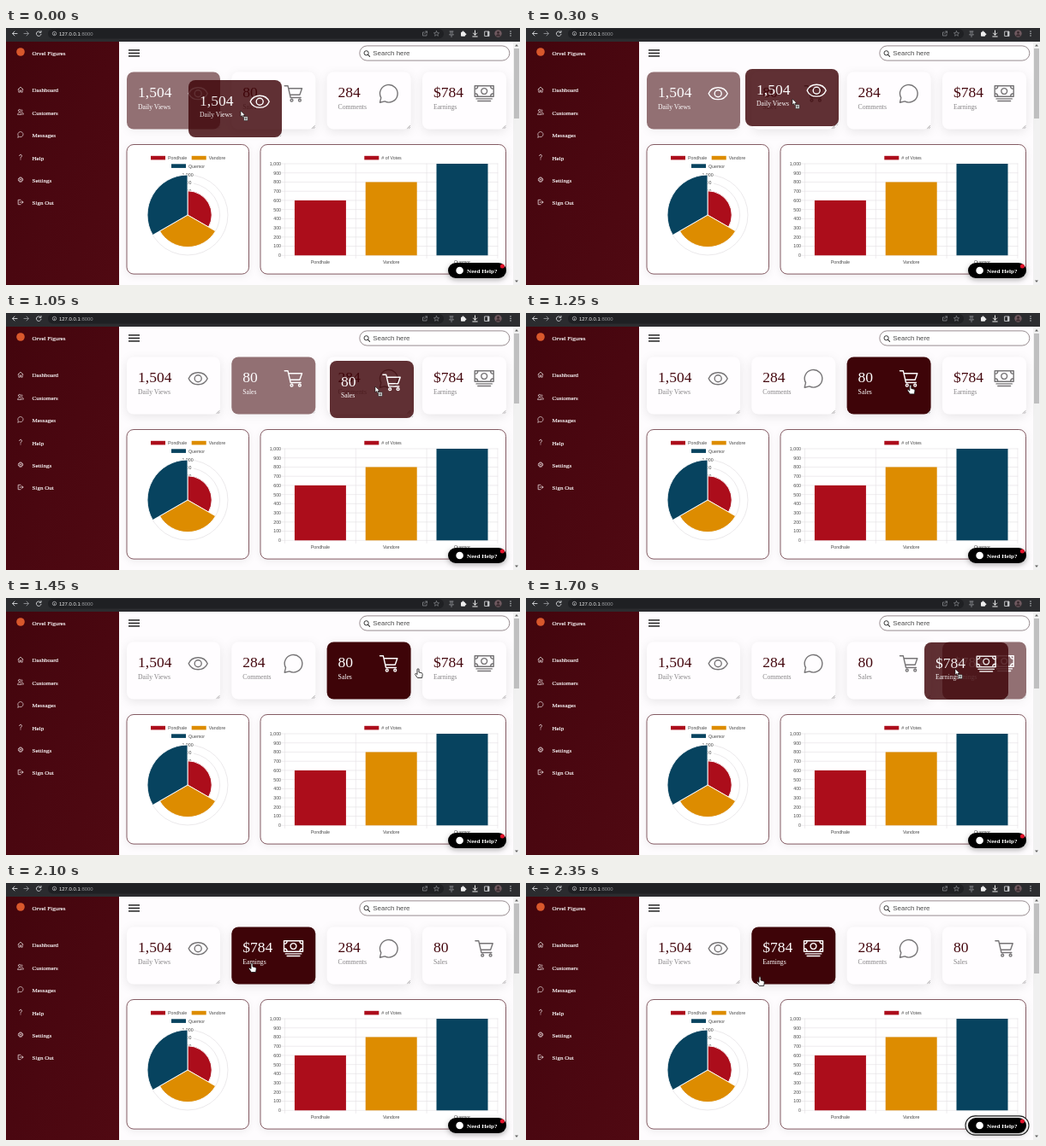
Write an HTML page that moves like this. It is 600 by 301 pixels and loops after 2400 ms.

```html
<!DOCTYPE html>
<html lang="en">
<head>
<meta charset="utf-8">
<title>Dashboard cards</title>
<style>
  html, body { margin: 0; width: 100%; height: 100%; overflow: hidden; background: #fefcfe; }
  svg { display: block; width: 600px; height: 301px; }
  text { white-space: pre; }
  .serif { font-family: "Liberation Serif", serif; }
  .sans { font-family: "Liberation Sans", sans-serif; }
  .nav { font-size: 7.05px; fill: #fff; stroke: #fff; stroke-width: .15px; }
  .line { fill: none; stroke-linecap: round; stroke-linejoin: round; }
  .tick { font-size: 5.27px; fill: #4c4c4c; }
  .panel { fill: #fff; stroke: #5c2630; stroke-width: .75px; filter: drop-shadow(0 2px 4px rgba(0, 0, 0, .07)); }
  .card .box { fill: #fffdff; filter: drop-shadow(0 3px 6px rgba(0, 0, 0, .09)); }
  .card .num { font-size: 17.5px; fill: #45080f; }
  .card .label { font-size: 7.7px; fill: #868486; }
  .card .icon { stroke: #777577; stroke-width: 1.4; }
  .card.hot .box { fill: #3e0408; }
  .card.hot text { fill: #fff; }
  .card.hot .icon { stroke: #fff; }
  .card.ghost { opacity: .56; }
  .card.drag { opacity: .82; }
  .card.drag .box { filter: none; }
</style>
</head>
<body>
<svg id="stage" viewBox="0 0 600 301" xmlns="http://www.w3.org/2000/svg"></svg>
<script>
const LOOP = 2400, STEP = 50;
const RED = '#ac0d1b', GOLD = '#dd8c00', BLUE = '#07435f';
const stage = document.getElementById('stage');

const rect = (x, y, w, h, fill, r = 0, extra = '') =>
  `<rect x="${x}" y="${y}" width="${w}" height="${h}" rx="${r}" fill="${fill}" ${extra}/>`;
const circle = (x, y, r, fill, extra = '') =>
  `<circle cx="${x}" cy="${y}" r="${r}" fill="${fill}" ${extra}/>`;
const text = (x, y, s, cls, extra = '') => `<text x="${x}" y="${y}" class="${cls}" ${extra}>${s}</text>`;
const line = (d, color, w = 1) => `<path class="line" d="${d}" stroke="${color}" stroke-width="${w}"/>`;
const at = (x, y, body) => `<g transform="translate(${x} ${y})">${body}</g>`;

function browserBar() {
  const c = '#c4c6c9', dim = '#85878b';
  return rect(0, 0, 600, 16, '#2b2c2f') + rect(49, 1, 462, 11.5, '#1f2023', 5.7) +
    line('M13 6.5H7.5M10 4L7.5 6.5L10 9', c) +
    line('M21 6.5H26.5M24 4L26.5 6.5L24 9', dim) +
    line('M40.5 5A2.8 2.8 0 1 0 41 7.3M41 3.5V5.3H39', c) +
    circle(56.5, 6.5, 2.2, 'none', `stroke="${c}" stroke-width=".7"`) + line('M56.5 6.3V7.6', c, .7) +
    `<text x="62" y="8.7" class="sans" font-size="5.95" fill="#f2f2f2">127.0.0.1<tspan fill="#9a9c9f">:8000</tspan></text>` +
    line('M488 5H486.5V9H491V7.5M488.5 6.8L491.5 4M489.5 4H491.5V6', dim, .8) +
    line('M502.5 3.5L503.4 5.6L505.6 5.8L503.9 7.2L504.4 9.3L502.5 8.1L500.6 9.3L501.1 7.2L499.4 5.8L501.6 5.6Z', dim, .7) +
    line('M518 4H522M519 4V6.5L517.5 8H522.5L521 6.5V4M520 8V10.5', dim, .9) +
    rect(531, 4.8, 5, 5, '#eee', .8) + circle(533.5, 4.5, 1.1, '#eee') + circle(536.3, 7.3, 1.1, '#eee') +
    line('M547.5 3V8M545.3 6L547.5 8.2L549.7 6M544.8 10H550.2', '#eee') +
    line('M559 4H564V9.5H559Z', c, .9) + rect(562, 4, 2, 5.5, c) +
    circle(574.5, 6.5, 4.2, '#6f5a60') + circle(574.5, 5.3, 1.5, '#3a2a2e') +
    `<path d="M571.7 9.4a2.9 2.9 0 0 1 5.6 0z" fill="#3a2a2e"/>` +
    [4, 6.5, 9].map(y => circle(589, y, .75, c)).join('');
}

function sidebar() {
  const w = '#e6dadc';
  const icons = [
    line('M-3 0L0 -3L3 0M-2.2 -.6V3.2H-.7V1H.7V3.2H2.2V-.6', w, .7),
    line('M-3.4 2.7C-3.2 -.2 .9 -.2 1.1 2.7ZM1.2 .5C2.5 .2 3.3 1.2 3.4 2.7H2.3M-2.6 -1.7A1.4 1.4 0 1 1 .2 -1.7A1.4 1.4 0 0 1 -2.6 -1.7M1.2 -2.8A1.2 1.2 0 0 1 1.4 -.6', w, .7),
    line('M-3.1 3.2L-2.7 1.5A3.1 3.1 0 1 1 -1.3 2.7Z', w, .7),
    line('M-1.3 -1.6C-1.3 -3.4 1.4 -3.4 1.4 -1.5C1.4 -.2 0 -.3 0 1M0 2.7V2.8', w, .9),
    circle(0, 0, 2.7, 'none', `stroke="${w}" stroke-width=".9" stroke-dasharray="1.6 .52"`) +
      circle(0, 0, 2, 'none', `stroke="${w}" stroke-width=".6"`) + circle(0, 0, .8, w),
    line('M0 -2.7H-2.8V2.7H0M-1 0H3M1.6 -1.4L3 0L1.6 1.4', w, .8)
  ];
  const names = ['Dashboard', 'Customers', 'Messages', 'Help', 'Settings', 'Sign Out'];
  return rect(0, 16, 132, 285, 'url(#wine)') + circle(17, 28, 4.8, '#d9582c') +
    text(30.5, 31.6, 'Orvel Figures', 'serif nav') +
    names.map((s, i) => at(17, 72 + i * 26.4, icons[i]) + text(30.5, 75.3 + i * 26.4, s, 'serif nav')).join('');
}

function header() {
  return [25.9, 29.4, 32.9].map(y => rect(143, y - .65, 13, 1.4, '#151515')).join('') +
    rect(412.8, 20.9, 175, 17.2, '#fff', 8.6, 'stroke="#75666a" stroke-width=".75"') +
    circle(420.6, 29.3, 2.6, 'none', 'stroke="#333" stroke-width="1"') + line('M422.6 31.3L424.6 33.3', '#333', 1.1) +
    text(428.3, 32.2, 'Search here', 'sans', 'font-size="7.95" fill="#4a4a4a"') +
    rect(592, 16, 8, 285, '#f1f1f1') + rect(593, 24, 6, 82, '#bfbfc0') +
    '<path d="M594 21.5h4l-2-2.5zM594 295.5h4l-2 2.5z" fill="#666"/>';
}

const series = [['Pondhale', 600, RED], ['Vandore', 800, GOLD], ['Quemor', 1000, BLUE]];
const comma = n => n.toLocaleString('en-US');
const legend = (x, y, s, color) => rect(x, y, 17, 4.6, color) + text(x + 20, y + 4.2, s, 'sans tick');

function polarChart() {
  const cx = 212, cy = 219, unit = .047;
  let out = rect(141, 136.5, 142.5, 151.6, '#fff', 8, 'class="panel"');
  [[169, 149.8], [216.7, 149.8], [193, 159.3]].forEach(([x, y], i) => out += legend(x, y, series[i][0], series[i][2]));
  for (let v = 200; v <= 1000; v += 200)
    out += circle(cx, cy, v * unit, 'none', 'stroke="#e2e0e2" stroke-width=".7"');
  for (let v = 200; v <= 1000; v += 200)
    out += rect(cx - 7, cy - v * unit - 3.3, 14, 6.6, '#fffc') +
      text(cx, cy - v * unit + 1.9, comma(v), 'sans tick', 'text-anchor="middle"');
  series.forEach(([, v, color], i) => {
    const p = k => {
      const a = (k * 120 - 90) * Math.PI / 180;
      return `${cx + v * unit * Math.cos(a)} ${cy + v * unit * Math.sin(a)}`;
    };
    out += `<path d="M${cx} ${cy}L${p(i)}A${v * unit} ${v * unit} 0 0 1 ${p(i + 1)}Z" fill="${color}" stroke="#fff" stroke-width=".9"/>`;
  });
  return out;
}

function barChart() {
  const x0 = 325.5, y0 = 266.3, cat = 82.8, unit = .1073;
  let out = rect(297, 136.5, 286.5, 151.6, '#fff', 8, 'class="panel"') + legend(418.3, 149.8, '# of Votes', RED);
  for (let v = 0; v <= 1000; v += 100) {
    const y = y0 - v * unit;
    out += line(`M322 ${y}H574`, '#e2e0e2', .6) + text(321, y + 1.9, comma(v), 'sans tick', 'text-anchor="end"');
  }
  for (let i = 0; i < 4; i++) out += line(`M${x0 + i * cat} 159V269.5`, '#e2e0e2', .6);
  series.forEach(([name, v, color], i) => {
    const mid = x0 + (i + .5) * cat;
    out += rect(mid - 30, y0 - v * unit, 60, v * unit, color) +
      text(mid, 276, name, 'sans tick', 'text-anchor="middle"');
  });
  return out;
}

const helpButton = () =>
  rect(0, 0, 0, 0, '#fff', 9, 'id="ring" stroke="#222" stroke-width="1.1"') +
  rect(516, 275, 68, 18, '#000', 9, 'style="filter:drop-shadow(0 2px 3px rgba(0,0,0,.3))"') +
  circle(529.6, 284, 4.3, '#fff') +
  text(538, 286.5, 'Need Help?', 'serif', 'font-size="7.15" font-weight="700" fill="#fff"') +
  circle(579.4, 279, 2.5, '#e3122b');

const slots = [141, 263.3, 374.6, 486], TOP = 51.5;
const cards = [
  ['1,504', 'Daily Views', 'M-11 0C-7 -9.3 7 -9.3 11 0C7 9.3 -7 9.3 -11 0ZM-4 0A4 4 0 1 1 4 0A4 4 0 1 1 -4 0'],
  ['80', 'Sales', 'M-10.3 -9H-6.5L-3.3 4.8H8.6M-5.8 -6H10L7.4 1.6H-4M-3.4 8A1.4 1.4 0 1 1 -.6 8A1.4 1.4 0 1 1 -3.4 8M6 8A1.4 1.4 0 1 1 8.8 8A1.4 1.4 0 1 1 6 8'],
  ['284', 'Comments', 'M-10.3 10.5L-9 5A10.3 10.3 0 1 1 -4.7 9.2Z'],
  ['$784', 'Earnings', 'M-11 -9H11V3.6H-11ZM-9.2 6.2H9.2M-7.4 8.8H7.4M-3.4 -2.7A3.4 3.4 0 1 1 3.4 -2.7A3.4 3.4 0 1 1 -3.4 -2.7M-11 -5.4C-8.5 -5.4 -7.4 -6.8 -7.4 -9M11 -5.4C8.5 -5.4 7.4 -6.8 7.4 -9M-11 0C-8.5 0 -7.4 1.4 -7.4 3.6M11 0C8.5 0 7.4 1.4 7.4 3.6']
];
function cardMarkup([num, label, icon], i) {
  const w = i ? 98 : 109;
  return rect(0, 0, w, 67, '#fff', 8, 'class="box"') +
    text(13, 29.6, num, 'serif num') + text(13, 43, label, 'serif label') +
    at(w - 25.8, 25.2, `<path class="line icon" d="${icon}"/>`) +
    line(`M${w - 4} 66L${w - 1} 63M${w - 2} 66L${w - 1} 65`, '#8a8789', .7);
}
const layer = cls => cards.map((c, i) => `<g class="${cls}">${cardMarkup(c, i)}</g>`).join('');

const hand = `<path d="M-1 .8C-1 -.6 1 -.6 1 .8V4L4.2 4.8Q5.4 5.2 5.2 6.6L4.6 10.5H-.6L-3.4 6.6C-3.8 5.6 -2.6 5 -1.9 5.8L-1 6.6Z" fill="#fff" stroke="#111" stroke-width=".8"/>`;
const arrow = '<path d="M0 0V7L1.7 5.5L2.9 8.2L4.1 7.7L2.9 5.1H5.1Z" fill="#fff" stroke="#111" stroke-width=".6"/>' +
  rect(3.6, 6.8, 4.6, 4.6, '#fff', .6, 'stroke="#222" stroke-width=".7"') + line('M4.8 9.1H7M5.9 8V10.2', '#222', .7);

stage.innerHTML =
  '<defs><linearGradient id="wine" x2="1" y2="1"><stop stop-color="#43050d"/><stop offset=".5" stop-color="#4a0710"/><stop offset="1" stop-color="#500912"/></linearGradient></defs>' +
  rect(0, 0, 600, 301, '#fefcfe') + header() + polarChart() + barChart() + layer('card') +
  helpButton() + sidebar() + browserBar() + layer('card hot drag') +
  `<g id="hand">${hand}</g><g id="arrow">${arrow}</g>`;

const all = [...stage.querySelectorAll('.card')];
const resting = all.slice(0, 4), dragged = all.slice(4);
const [handEl, arrowEl, ring] = ['hand', 'arrow', 'ring'].map(id => document.getElementById(id));

// start, card order, hovered card; cards reorder live while hover sticks to the grabbed slot
const scenes = [
  [0, [0, 1, 2, 3], 0],
  [450, [0, 1, 2, 3], 1],
  [1100, [0, 2, 1, 3], 2],
  [1200, [0, 2, 1, 3], 1],
  [1500, [0, 2, 1, 3], 3],
  [1800, [0, 2, 3, 1], 1],
  [1950, [0, 3, 2, 1], 1],
  [2100, [0, 3, 2, 1], 3]
];
// start, end, card, path of its picture [t, x, y]
const drags = [
  [0, 450, 0, [[0, 213, 61], [100, 236, 53], [200, 251, 49], [300, 256, 48]]],
  [900, 1200, 1, [[900, 266, 52], [950, 293, 53], [1000, 340, 55], [1050, 378, 56], [1100, 391, 55]]],
  [1650, 2100, 3, [[1650, 484, 52], [1700, 465, 52], [1800, 373, 54], [1900, 265.5, 55], [1950, 253, 56]]]
];
const pointer = [[0, 274, 97], [100, 295, 89], [200, 307, 84], [300, 311, 83], [800, 315, 83], [900, 319, 83],
  [950, 346, 84], [1000, 393, 86], [1050, 431, 86], [1100, 444, 85], [1350, 452, 84], [1450, 481, 83],
  [1550, 518, 83], [1650, 520, 83], [1700, 501, 83], [1800, 409, 86], [1900, 302, 90], [1950, 289, 92],
  [2100, 287, 94], [2300, 274, 109], [2350, 273, 110]];

function track(path, t) {
  const i = path.findIndex(p => p[0] > t);
  if (i < 0) return path[path.length - 1].slice(1);
  const a = path[i - 1], b = path[i], k = (t - a[0]) / (b[0] - a[0]);
  return [a[1] + (b[1] - a[1]) * k, a[2] + (b[2] - a[2]) * k];
}
const move = (el, x, y) => el.setAttribute('transform', `translate(${x} ${y})`);
const show = (el, on) => el.style.display = on ? '' : 'none';

function draw(t) {
  const [, order, hot] = scenes.filter(s => s[0] <= t).pop();
  const [, , held, path] = drags.find(d => d[0] <= t && t < d[1]) || [];
  order.forEach((id, slot) => {
    const el = resting[id];
    move(el, slots[slot], TOP);
    el.classList.toggle('hot', id === hot);
    el.classList.toggle('ghost', id === held);
    show(dragged[id], id === held);
  });
  if (path) move(dragged[held], ...track(path, t));
  const [x, y] = track(pointer, t);
  move(handEl, x, y);
  move(arrowEl, x, y);
  show(handEl, !path);
  show(arrowEl, path);

  const grow = Math.max(0, Math.min(1, (t - 2100) / 100)) * 3;
  show(ring, grow > 0);
  const box = { x: 516 - grow, y: 275 - grow * .7, width: 68 + 2 * grow, height: 18 + 1.4 * grow, rx: 9 + grow * .7 };
  for (const k in box) ring.setAttribute(k, box[k]);
}

const start = performance.now();
function tick() {
  const t = (performance.now() - start) % LOOP;
  draw(Math.floor(t / STEP) * STEP);
  requestAnimationFrame(tick);
}
tick();
</script>
</body>
</html>
```
